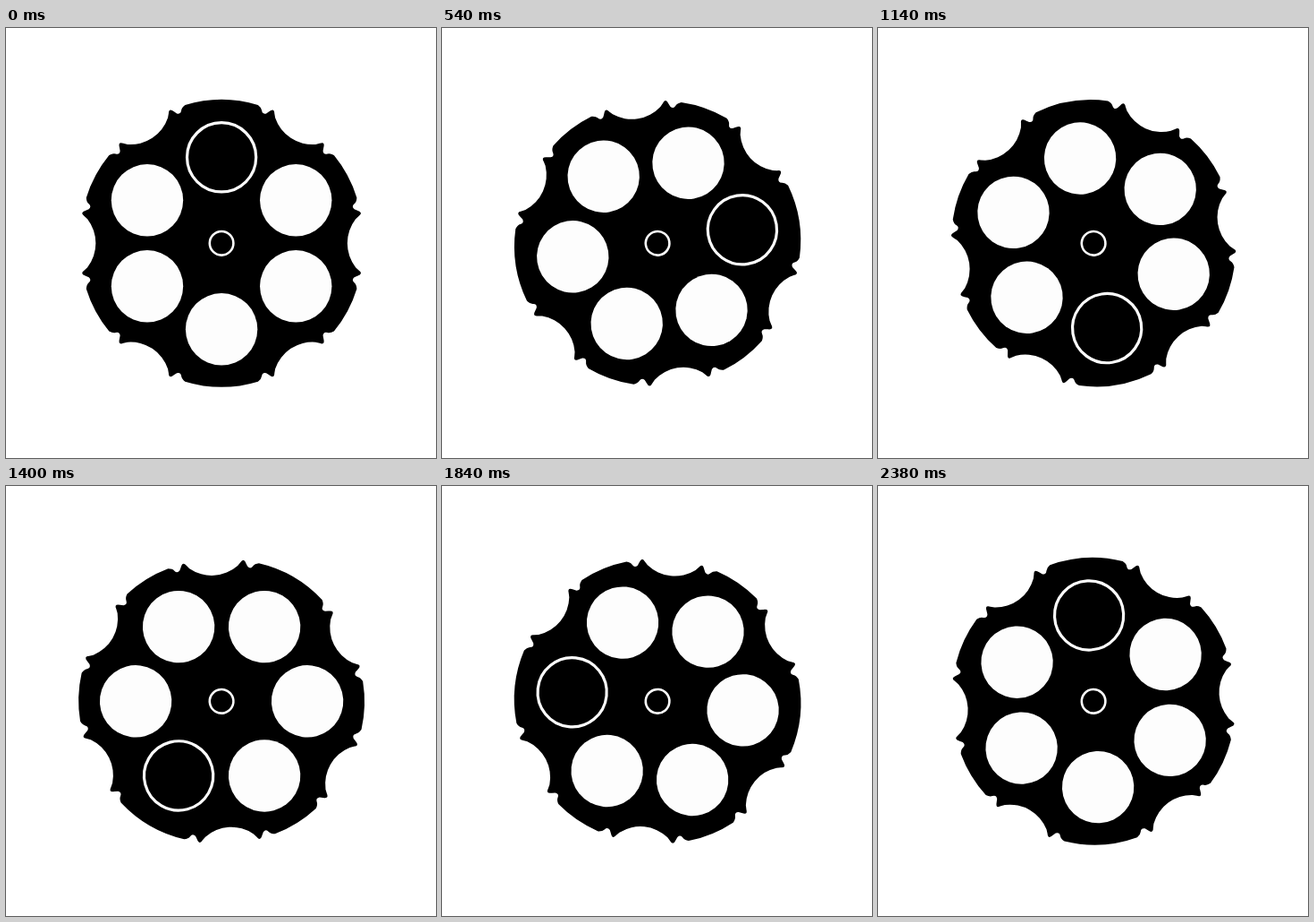
Recreate the animation shown at these times as an HTML page. Size 481 by 480 pixels, loop 2.4 s.

```html
<!DOCTYPE html>
<html lang="en">
<head>
<meta charset="utf-8">
<title>Revolving cylinder</title>
<style>
  html, body { margin: 0; width: 100%; height: 100%; overflow: hidden; background: #fff; }
  svg { display: block; width: 100vw; height: 100vh; }
</style>
</head>
<body>
<svg viewBox="0 0 481 480">
  <g id="wheel">
    <path id="body"/>
    <g id="holes" fill="#fdfdfd"></g>
    <circle cy="-96" r="38.6" fill="none" stroke="#fdfdfd" stroke-width="3.2"/>
    <circle r="13.3" fill="none" stroke="#fdfdfd" stroke-width="2.6"/>
  </g>
</svg>
<script>
const LOOP = 2400, STEP = 20, CX = 241.1, CY = 240.3;
const $ = id => document.getElementById(id);
const rad = deg => deg * Math.PI / 180;

// One scalloped notch with a small tooth on each side, pointing at angle deg.
function notch(deg) {
  const c = Math.cos(rad(deg)), s = Math.sin(rad(deg));
  const p = (x, y) => `${(x * c - y * s).toFixed(2)} ${(x * s + y * c).toFixed(2)} `;
  return p(151.3, -50.9) +
    'Q' + p(151, -46) + p(148.5, -44) +
    'Q' + p(145, -41) + p(148.5, -38) +
    'L' + p(152, -36.5) +
    'Q' + p(159, -34.2) + p(153.5, -30.3) +
    'L' + p(150, -27) +
    'A44 44 0 0 0 ' + p(150, 27) +
    'L' + p(153.5, 30.3) +
    'Q' + p(159, 34.2) + p(152, 36.5) +
    'L' + p(148.5, 38) +
    'Q' + p(145, 41) + p(148.5, 44) +
    'Q' + p(151, 46) + p(151.3, 50.9);
}

const rim = 'A140 140 0 0 1 ';
const notches = [0, 56.6, 123.4, 180, 236.6, 303.4].map(notch);
$('body').setAttribute('d', 'M' + notches.join(rim) + rim + notches[0].split('Q')[0] + 'Z');

for (let i = 1; i < 6; i++) {
  const hole = document.createElementNS('http://www.w3.org/2000/svg', 'circle');
  hole.setAttribute('cx', 96 * Math.sin(rad(60 * i)));
  hole.setAttribute('cy', -96 * Math.cos(rad(60 * i)));
  hole.setAttribute('r', 40.2);
  $('holes').append(hole);
}

function draw(ms) {
  const t = Math.floor((ms % LOOP) / STEP) * STEP;
  $('wheel').setAttribute('transform', `translate(${CX} ${CY}) rotate(${t / LOOP * 360})`);
}

let start;
function tick(now) {
  start ??= now;
  draw(now - start);
  requestAnimationFrame(tick);
}
draw(0);
requestAnimationFrame(tick);
</script>
</body>
</html>
```
